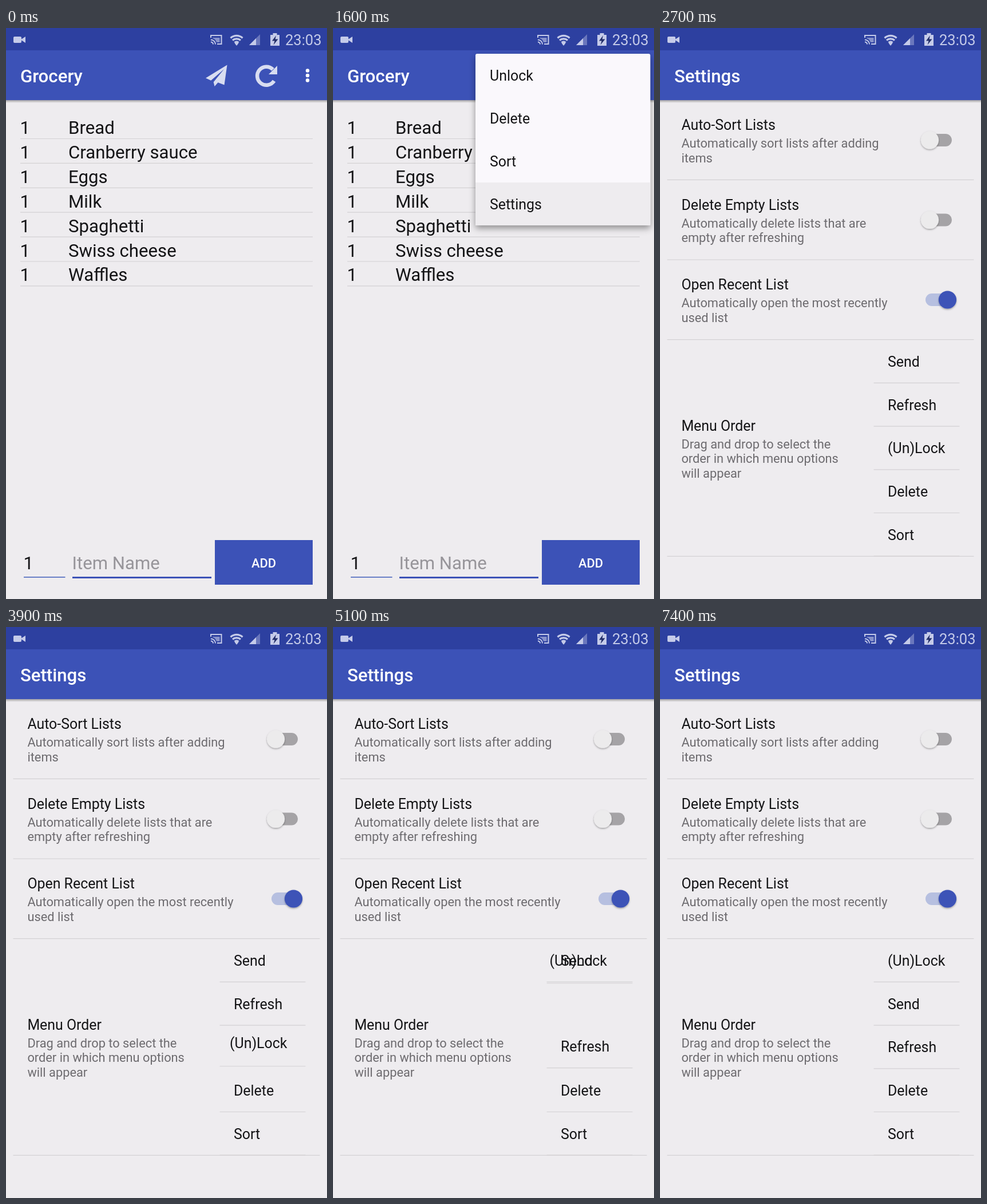
Recreate the animation shown at these times as an HTML page. Size 561 by 998 pixels, loop 8 s.

```html
<!DOCTYPE html>
<html>
<head>
<meta charset="utf-8">
<style>
  html, body { margin: 0; width: 100%; height: 100%; overflow: hidden; background: #eeecef; }
  svg { display: block; }
  text { font-family: Roboto, "Noto Sans", sans-serif; fill: #141416; white-space: pre; }
  .big { font-size: 31.2px; }
  .mid { font-size: 24.9px; }
  .small { font-size: 21.8px; fill: #6d6b6f; }
  .bold { font-weight: 500; fill: #fff; }
  .line { stroke: #d3d1d4; stroke-width: 1.2; }
</style>
</head>
<body>
<svg width="561" height="998" viewBox="0 0 561 998">
  <defs>
    <linearGradient id="fade" x2="0" y2="1">
      <stop stop-color="#000" stop-opacity=".32"/>
      <stop offset="1" stop-color="#000" stop-opacity="0"/>
    </linearGradient>
    <filter id="lift" x="-30%" y="-30%" width="160%" height="160%">
      <feDropShadow dx="0" dy="1.5" stdDeviation="1.4" flood-opacity=".35"/>
    </filter>
    <filter id="float" x="-10%" y="-10%" width="120%" height="125%">
      <feDropShadow dx="0" dy="5" stdDeviation="6" flood-opacity=".4"/>
    </filter>
  </defs>
  <g id="grocery"></g>
  <g id="settings"></g>
  <g id="popup"></g>
  <g id="status" fill="#c5cbe9">
    <rect x="13" y="15" width="14" height="11" rx="2"/>
    <path d="M27 19.500L34 15V26L27 21.500Z"/>
    <g fill="none" stroke="#c5cbe9" stroke-width="2">
      <path d="M358 17V13H376.500V28H369M358 20.500A8 8 0 0 1 366 28.500M358 24.500A4 4 0 0 1 362 28.500"/>
      <path d="M392.500 17.500A15.500 15.500 0 0 1 413.500 17.500M396 21.500A10.500 10.500 0 0 1 410 21.500M399.500 25.500A5.500 5.500 0 0 1 406.500 25.500" stroke-width="3.200"/>
    </g>
    <path d="M361 17H373.500V25H368Q366 19 361 18Z" opacity=".6"/>
    <path d="M399.500 26.500Q403 24 406.500 26.500L403 31Z"/>
    <path d="M425 30L444 11V30Z" opacity=".4"/>
    <path d="M425 30L437 18V30Z"/>
    <path d="M462 12H466.500V9H473.500V12H478V31H462Z"/>
    <path d="M472 13L465 22.500H469.500L467.500 29.500L475.500 19.500H470.500Z" fill="#222d68"/>
    <text x="488" y="29.500" font-size="25.500" style="fill:#c5cbe9">23:03</text>
  </g>
</svg>
<script>
const $ = id => document.getElementById(id);
const BLUE = '#3c52b7', DARK = '#2d40a0', PAPER = '#eeecef';
const PITCH = 75.7;

const text = (x, y, s, cls, extra = '') => `<text x="${x}" y="${y}" class="${cls}" ${extra}>${s}</text>`;
const rect = (x, y, w, h, fill, extra = '') =>
  `<rect x="${x}" y="${y}" width="${w}" height="${h}" fill="${fill}" ${extra}/>`;
const line = (x1, x2, y) => `<path class="line" d="M${x1} ${y}H${x2}"/>`;

const frame = title =>
  rect(0, 0, 561, 998, PAPER) + rect(0, 126, 561, 5, 'url(#fade)') +
  rect(0, 0, 561, 39, DARK) + rect(0, 39, 561, 87, BLUE) + text(24.9, 95, title, 'big bold');

const toolbarIcons = `
  <g fill="#d8ddf1">
    <path d="M386.500 64.500L381.500 99.500L370.500 95.300L364.500 102L362.700 94.600L381 72L358.200 91.800L349 87.500Z"/>
    <path d="M468.500 92.500A16 16 0 1 1 466.500 72.500" fill="none" stroke="#d8ddf1" stroke-width="6.500"/>
    <path d="M474 66V81H459Z"/>
  </g>` + [74.5, 83, 91.5].map(y => `<circle cx="527" cy="${y}" r="3.2" fill="#fff"/>`).join('');

const items = ['Bread', 'Cranberry sauce', 'Eggs', 'Milk', 'Spaghetti', 'Swiss cheese', 'Waffles'];
$('grocery').innerHTML = frame('Grocery') + toolbarIcons +
  items.map((name, i) => {
    const y = 185 + i * 42.9;
    return text(24.5, y, 1, 'big') + text(109, y, name, 'big') + line(25, 536, y + 8.5);
  }).join('') +
  text(30.5, 946, 1, 'big') + text(115.5, 946, 'Item Name', 'big', 'style="fill:#97959a"') +
  rect(31, 959, 72.5, 1.6, '#4a66bd') + rect(116, 959, 243, 3, BLUE) +
  rect(365, 895, 171, 78, BLUE) + text(429, 943, 'ADD', 'small bold', 'style="fill:#fff"');

const toggle = (y, on) => on
  ? rect(464, y - 11, 46, 22, '#b6bfe0', 'rx="11"') +
    `<circle cx="502.5" cy="${y}" r="15.6" fill="${BLUE}" filter="url(#lift)"/>`
  : rect(464, y - 11, 46, 22, '#a5a3a6', 'rx="11"') +
    `<circle cx="471.500" cy="${y}" r="15.6" fill="#ecebec" filter="url(#lift)"/>`;

const option = (y, title, lines) => text(37.4, y, title, 'mid') +
  lines.map((s, i) => text(37.4, y + 31 + i * 25.6, s, 'small')).join('');

const orderNames = ['Send', 'Refresh', '(Un)Lock', 'Delete', 'Sort'];
$('settings').innerHTML = frame('Settings') +
  option(178, 'Auto-Sort Lists', ['Automatically sort lists after adding', 'items']) +
  option(317.6, 'Delete Empty Lists', ['Automatically delete lists that are', 'empty after refreshing']) +
  option(457.2, 'Open Recent List', ['Automatically open the most recently', 'used list']) +
  option(703.5, 'Menu Order', ['Drag and drop to select the', 'order in which menu options', 'will appear']) +
  toggle(196, false) + toggle(335.5, false) + toggle(475, true) +
  [265.3, 405, 544.6, 923.3].map(y => line(12.5, 548.5, y)).join('') +
  orderNames.map((name, i) => {
    const y = 592 + i * PITCH;
    return `<g>${text(398, y, name, 'mid')}${line(373.5, 523.5, y + 28.4)}</g>`;
  }).join('');
const rows = [...$('settings').querySelectorAll('g')];

$('popup').innerHTML = rect(249, 45, 305.5, 300, '#faf8fc', 'rx="3" filter="url(#float)"') +
  rect(249, 270, 305.5, 75, '#eeecef', 'id="press"') +
  ['Unlock', 'Delete', 'Sort', 'Settings'].map((s, i) => text(274, 92 + i * 75, s, 'mid')).join('');

// time, text dx, text dy, divider dy of the dragged row
const drag = [
  [3600, 0, 0, 0], [3900, -7, -7, -4], [4300, -11, -28, -26], [4700, -15, -70, -68],
  [5100, -19.5, -151, -149], [5500, -21, -163, -163], [6000, -21, -170.5, -171],
  [6400, -21, -170.5, -171], [7100, -20, -166, -166], [7400, 0, -2 * PITCH, -2 * PITCH]
];

const clamp = v => Math.max(0, Math.min(1, v));
const span = (t, a, b) => clamp((t - a) / (b - a));
const ease = p => 1 - (1 - p) ** 2;

function dragAt(t) {
  let i = 0;
  while (i < drag.length - 2 && t >= drag[i + 1][0]) i++;
  const a = drag[i], b = drag[i + 1], p = span(t, a[0], b[0]);
  return a.map((v, k) => v + (b[k] - v) * p);
}

const shift = (el, x, y) => el.setAttribute('transform', `translate(${x} ${y})`);

function draw(t) {
  const grow = ease(span(t, 600, 800)), leave = span(t, 1720, 1900);
  const scale = 0.85 + 0.15 * grow;
  $('popup').setAttribute('opacity', grow * (1 - leave));
  $('popup').setAttribute('transform', `translate(554 45) scale(${scale}) translate(-554 -45)`);
  $('press').setAttribute('opacity', span(t, 1450, 1550));

  const show = span(t, 2270, 2620) ** 2, zoom = 0.979 + 0.021 * show;
  $('settings').setAttribute('opacity', show);
  $('settings').setAttribute('transform', `translate(280.5 499) scale(${zoom}) translate(-280.5 -499)`);

  const [, dx, dy, lineDy] = dragAt(t);
  const [send, refresh, lock] = rows;
  shift(send, 0, PITCH * ease(span(t, 5150, 5450)));
  shift(refresh, 0, PITCH * ease(span(t, 4830, 5140)));
  shift(lock.firstChild, dx, dy);
  shift(lock.lastChild, 0, lineDy);
}

function tick() {
  draw(performance.now() % 8000);
  requestAnimationFrame(tick);
}
tick();
</script>
</body>
</html>
```
